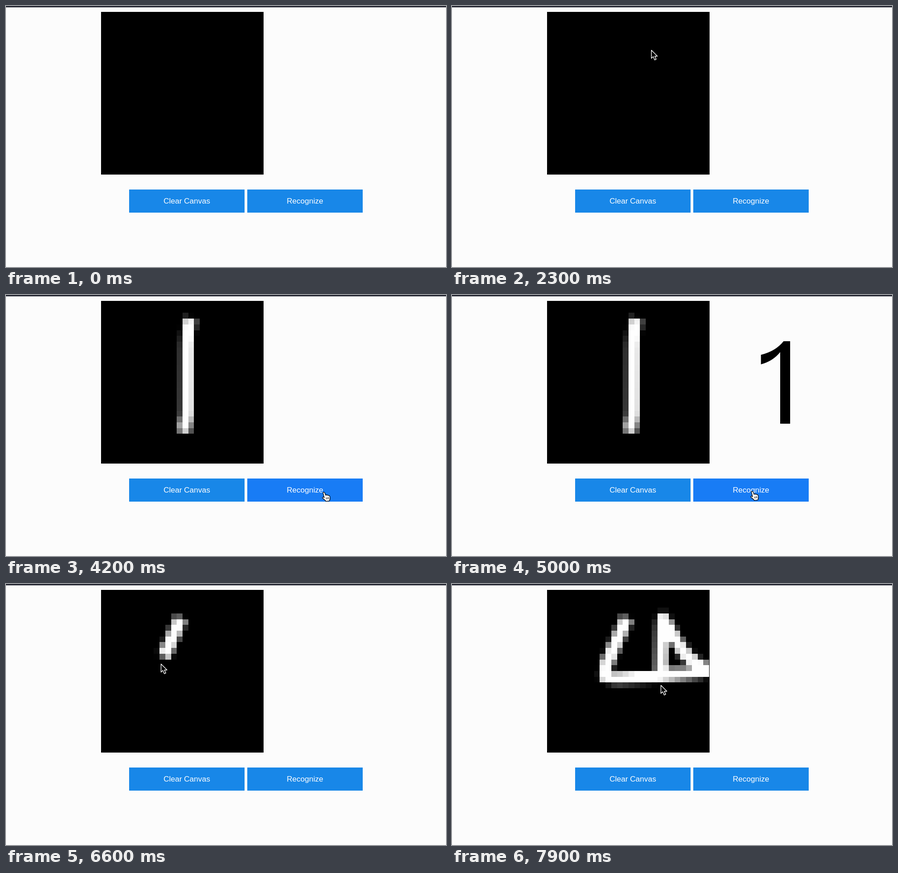
Recreate the animation shown at these times as an HTML page with a canvas. Size 972 by 576 pixels, loop 8 s.

```html
<!DOCTYPE html>
<html lang="en">
<head>
<meta charset="utf-8">
<title>Digit recognizer</title>
<style>
  html, body { margin: 0; width: 100%; height: 100%; overflow: hidden; background: #fcfcfc; }
  #stage { position: relative; width: 972px; height: 576px; overflow: hidden; }
  #stage > * { position: absolute; }
  #bar { left: 0; top: 0; width: 972px; height: 2.5px; background: #2a2c37; }
  #frame { left: 210px; top: 13px; width: 359px; height: 359px; background: #000; }
  #pad { left: 212px; top: 14px; width: 356px; height: 356px; image-rendering: pixelated; }
  .button {
    top: 405px; width: 255px; height: 51px; background: #1887e8; color: #fff;
    font: 17px/51px "Liberation Sans", Arial, sans-serif; text-align: center;
  }
  .button.hover { background: #187cf5; }
  #clear { left: 272px; }
  #recognize { left: 533px; }
  #overlay { left: 0; top: 0; }
</style>
</head>
<body>
<div id="stage">
  <div id="bar"></div>
  <div id="frame"></div>
  <canvas id="pad" width="28" height="28"></canvas>
  <div class="button" id="clear">Clear Canvas</div>
  <div class="button" id="recognize">Recognize</div>
  <svg id="overlay" width="972" height="576">
    <path id="answer" role="img" aria-label="1"
      d="M747 284H725V126Q709 146 682.5 153V132Q715 124 732.5 102H747Z"/>
    <g id="cursor" stroke-linejoin="round">
      <path id="arrow" fill="#000" stroke="#fff" stroke-width="1.4"
        d="M.5 .5V18.5L4.5 14.7L7.7 22L11 20.6L8 13.8H13.7Z"/>
      <g id="hand" transform="translate(-4 -1)" stroke="#000" stroke-width="1.3">
        <path fill="#fff" d="M2.2 2.2C3.5 .3 5.6 .9 6.3 2.8L8.2 8C9 6.6 11 6.8 11.5 8C12.7 7 14.3 7.6 14.7 8.9C16 8.4 17.2 9.2 17.5 10.8C18.3 14 18 17 16.6 20.3L8.8 21.4C7.4 19 4 16.6 1.4 14.4C.2 13 1.6 11.3 3.4 12.2L5 13.2Z"/>
        <path fill="none" stroke-width="1" d="M9 13L10.3 17M11.7 12.5L12.8 16.5M14.2 12L15 16"/>
      </g>
    </g>
  </svg>
</div>
<script>
const LOOP = 8000, STEP = 100, INK_LAG = 40;
const ENTERED = 400, ANSWERED = 4800, CLEARED = 5700;
const PAD = { x: 212, y: 14, cell: 356 / 28 };
const $ = id => document.getElementById(id);
const linear = p => p;
const easeIn = p => p ** 1.5;
const easeInOut = p => p * p * (3 - 2 * p);
const toStage = ([x, y]) => [PAD.x + x * PAD.cell, PAD.y + y * PAD.cell];

const pen = $('pad').getContext('2d');
pen.strokeStyle = '#fefefe';
pen.lineWidth = 2.1;
pen.lineJoin = 'round';

// Pen paths in pad cells
const one = {
  start: 2960, end: 3700, until: CLEARED, ease: easeIn,
  points: [[15.35, 3], [15, 5], [14.87, 8], [14.85, 19.5], [14.2, 22.7]]
};
const four = {
  start: 6345, end: 7900, until: LOOP, ease: linear,
  points: [[13.73, 4.8], [10.1, 13], [9.95, 15], [12, 15.2], [19, 14.9], [28, 14],
    [25.3, 12.4], [23.4, 10.5], [19.95, 4.9], [19.83, 7], [19.6, 16.4]]
};

const entry = [975, 415], idle = [500, 181], recognize = [702, 435], clear = [507, 427];
const first = s => toStage(s.points[0]);
const last = s => toStage(s.points[s.points.length - 1]);
const move = (start, end, from, to) => ({ start, end, ease: easeInOut, points: [from, to] });
const drag = s => ({ ...s, points: s.points.map(toStage) });
const gestures = [
  move(ENTERED, 1300, entry, idle),
  move(1300, one.start, idle, first(one)),
  drag(one),
  move(one.end, 4200, last(one), recognize),
  move(ANSWERED, 5500, recognize, clear),
  move(CLEARED, four.start, clear, first(four)),
  drag(four)
];

// The part of a gesture's path travelled by time t, at its eased pace
function travelled({ points, start, end, ease }, t) {
  const lengths = points.slice(1).map(([x, y], i) => Math.hypot(x - points[i][0], y - points[i][1]));
  const progress = ease(Math.min(1, Math.max(0, (t - start) / (end - start))));
  let left = progress * lengths.reduce((a, b) => a + b);
  const path = [points[0]];
  for (let i = 0; i < lengths.length && left > 0; i++) {
    const f = Math.min(1, left / lengths[i]), [x, y] = points[i], [nx, ny] = points[i + 1];
    path.push([x + (nx - x) * f, y + (ny - y) * f]);
    left -= lengths[i];
  }
  return path;
}

function drawInk(stroke, t) {
  if (t >= stroke.until) return;
  pen.beginPath();
  travelled(stroke, t - INK_LAG).forEach(p => pen.lineTo(...p));
  pen.stroke();
}

const show = (id, on) => { $(id).style.display = on ? '' : 'none'; };

function render(t) {
  pen.clearRect(0, 0, 28, 28);
  drawInk(one, t);
  drawInk(four, t);

  const current = gestures.filter(g => g.start <= t).pop() || gestures[0];
  const [x, y] = travelled(current, t).pop();
  let pointing = false;
  for (const id of ['clear', 'recognize']) {
    const { offsetLeft: left, offsetTop: top, offsetWidth: w, offsetHeight: h } = $(id);
    const over = t >= ENTERED && x >= left && x < left + w && y >= top && y < top + h;
    $(id).classList.toggle('hover', over);
    pointing = pointing || over;
  }
  $('cursor').setAttribute('transform', `translate(${Math.round(x)} ${Math.round(y)})`);
  show('cursor', t >= ENTERED);
  show('arrow', !pointing);
  show('hand', pointing);
  show('answer', t >= ANSWERED && t < CLEARED);
}

const start = performance.now();
function tick() {
  const t = Math.max(0, performance.now() - start) % LOOP;
  render(Math.floor(t / STEP) * STEP);
  requestAnimationFrame(tick);
}
tick();
</script>
</body>
</html>
```
